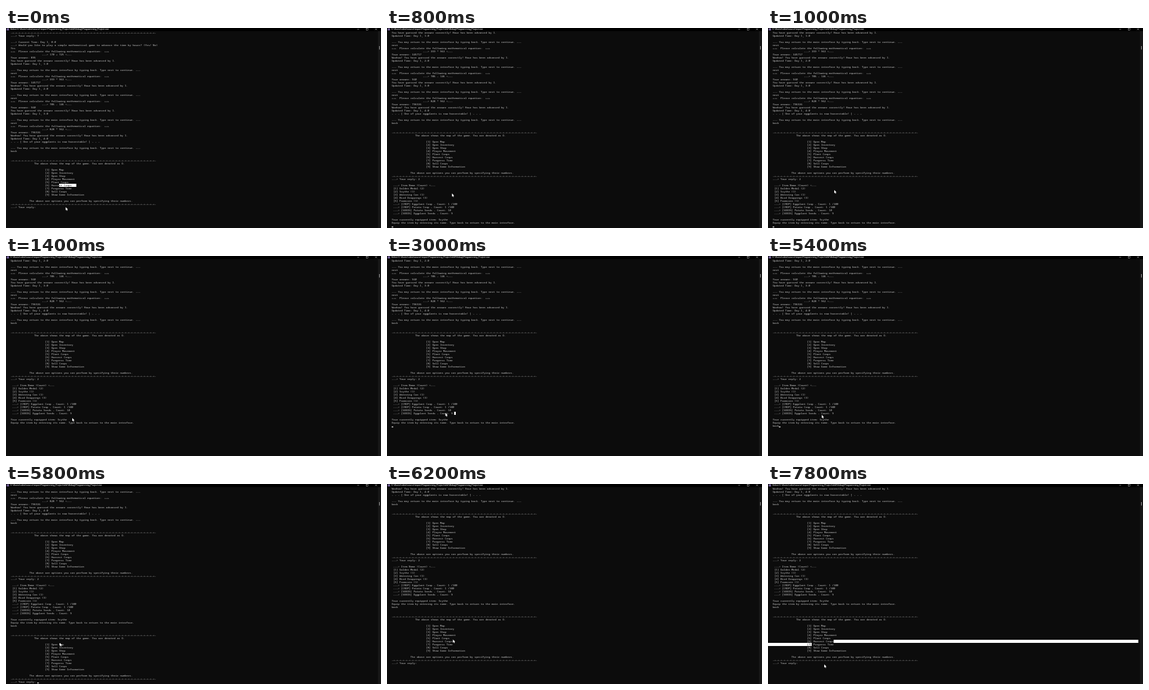
An HTML page with a canvas that plays this animation: 600 px wide and 321 px high, repeating every 8 s.

```html
<!DOCTYPE html>
<html lang="en">
<head>
<meta charset="utf-8">
<title>Console</title>
<style>
html, body { margin: 0; width: 100%; height: 100%; overflow: hidden; background: #0c0c0c; }
canvas { display: block; }
</style>
</head>
<body>
<canvas id="stage" width="600" height="321"></canvas>
<script>
const ctx = document.getElementById('stage').getContext('2d');
const LOOP = 8000, STEP = 200, CW = 2.5, RH = 5, ROWS = 63, BG = '#0c0c0c';
const PATH = 'C:\\Users\\robin\\source\\repos\\Programming_Project\\x64\\Debug\\Programming_Project.exe';

// Console text; the left margin is three columns
const pad = (n, s) => ' '.repeat(n) + s;
const rule = pad(3, '-+'.repeat(46) + '-');
const more = '--- You may return to the main interface by typing back. Type next to continue. ---';
const left = (...list) => list.map(s => pad(3, s));

function quiz(sum, answer, cheer, hour) {
  return left('+++  Please calculate the following mathematical equation:  +++',
    pad(20, `---> ${sum} <---`), `Your answer: ${answer}`,
    `${cheer} the answer correctly! Hour has been advanced by 1.`,
    `Updated Time: Day 1, ${hour}:0`);
}

const options = ['Open Map', 'Open Inventory', 'Open Shop', 'Player Movement', 'Plant Crops',
  'Harvest Crops', 'Progress Time', 'Sell Crops', 'Show Game Information'];
const menu = ['', '', rule,
  pad(18, 'The above shows the map of the game. You are denoted as O.'), '',
  ...options.map((s, i) => pad(25, `[${i + 1}] ${s}`)), '',
  pad(15, 'The above are options you can perform by specifying their numbers.'), rule];
const next = ['', ...left(more, 'next')];
const plain = 'You have guessed', happy = 'Woohoo! You have guessed';

const lines = [
  rule, ...left('---> Your reply: 7', '', '---> Current Time: Day 1, 0:0',
    '---> Would you like to play a simple mathematical game to advance the time by hours? (Yes/ No)', 'Yes'),
  ...quiz('170 + 725', 895, plain, 1), ...next,
  ...quiz('359 * 963', 345717, happy, 2), ...next,
  ...quiz('706 - 146', 560, plain, 3), ...next,
  ...quiz('828 * 962', 796536, happy, 4),
  ...left('- - - [ One of your eggplants is now harvestable! ] - - -', '', more, 'back'),
  ...menu];
const reply = lines.length;
lines.push('', '', ...[
  '---> Item Name (Count) <---', '[1] Golden Medal (2)', '[2] Scythe (1)', '[3] Watering Can (1)',
  '[4] Bird Droppings (3)', '[5] Farmcoin (1)',
  '---> [CROP] Eggplant Crop - Count: 1 /100', '---> [CROP] Potato Crop - Count: 1 /100',
  '---> [SEEDS] Potato Seeds - Count: 10', '---> [SEEDS] Eggplant Seeds - Count: 9'
].map(s => pad(4, s)), '', ...left('Your currently equipped item: Scythe',
  'Equip the item by entering its name. Type back to return to the main interface.'));
const equip = lines.length;
lines.push('', ...menu, pad(3, '---> Your reply: '));
const last = lines.length - 1;

// [start, scrolled lines, last printed line]
const views = [[0, 0, reply], [800, 9, equip], [1400, 18, equip], [5800, 27, last], [6200, 33, last]];

// [start, ...[row, from column, to column]]
const selections = [[0, [50, 34, 45]], [400], [3000, [50, 43, 44]], [3400, [56, 21, 22]], [5000],
  [7000, [50, 42, 43]], [7200, [50, 42, 237], [51, 0, 28]]];

// [time, x, y] of the pointer tip
const pointer = [[0, 95.5, 287.5], [1000, 106, 260], [1600, 106, 260], [3000, 93.5, 252],
  [3400, 53, 282], [4000, 75.5, 265.5], [4800, 75.5, 265.5], [5400, 86, 255], [5800, 86, 255],
  [6200, 105.5, 249.5], [7000, 105.5, 249.5], [7400, 69, 255], [7800, 90, 289.5]];

const at = (list, t) => list.filter(e => e[0] <= t).pop();

function pointerAt(t) {
  const i = pointer.findIndex(p => p[0] >= t);
  if (i < 1) return pointer[0].slice(1);
  const [t0, x0, y0] = pointer[i - 1], [t1, x1, y1] = pointer[i];
  const k = (t - t0) / (t1 - t0);
  return [x0 + (x1 - x0) * k, y0 + (y1 - y0) * k];
}

function caretOn(t) {
  if (t < 400 || t >= 7000) return false;
  if (t >= 2650 && t < 6000) return true;
  return Math.floor(t / 530) % 2 === (t < 6000 ? 1 : 0);
}

function box(color, x, y, w, h) {
  ctx.fillStyle = color;
  ctx.fillRect(x, y, w, h);
}

// Drawn large and scaled down so that advances stay fractional
function text(s, x, y, color, font, size) {
  ctx.save();
  ctx.translate(x, y);
  ctx.scale(1 / 6, 1 / 6);
  ctx.font = `${size * 6}px ${font}`;
  ctx.fillStyle = color;
  ctx.fillText(s, 0, 0);
  ctx.restore();
}

const mono = (s, col, row, color) =>
  text(s, col * CW, row * RH + 3.9, color, '"Noto Sans Mono", monospace', CW / 0.6);

function drawFrame(selecting) {
  box('#000', 0, 0, 600, 5);
  box('#6b5a8e', 1, 0.5, 4, 3.5);
  text((selecting ? 'Select ' : '') + PATH, 7, 3.3, '#fff', 'Roboto, sans-serif', 3.65);
  box('#ccc', 562, 1.8, 3, 0.5);
  ctx.lineWidth = 0.5;
  ctx.strokeStyle = '#ccc';
  ctx.strokeRect(576.5, 0.7, 2.6, 2.6);
  ctx.beginPath();
  ctx.moveTo(590.7, 0.6); ctx.lineTo(593.5, 3.4);
  ctx.moveTo(593.5, 0.6); ctx.lineTo(590.7, 3.4);
  ctx.stroke();
  box('#171717', 595, 5, 5, 316);
  box('#9f9f9f', 597, 29, 1, 5.5);
}

function drawPointer(x, y) {
  ctx.save();
  ctx.translate(x, y);
  ctx.beginPath();
  [[0, 0], [0, 5.2], [1.2, 4.1], [2, 6], [2.9, 5.6], [2.1, 3.8], [3.7, 3.7]]
    .forEach(p => ctx.lineTo(...p));
  ctx.closePath();
  ctx.fillStyle = '#fff';
  ctx.fill();
  ctx.restore();
}

function draw(t) {
  const [, scroll, end] = at(views, t);
  const [, ...selected] = at(selections, t);
  const typed = t < 5200 ? '' : t < 5400 ? 'ba' : 'back';
  lines[reply] = pad(3, '---> Your reply: ') + (t < 600 ? '' : '2');
  lines[equip] = pad(3, typed);

  box(BG, 0, 0, 600, 321);
  for (let row = 1; row <= ROWS && row - 1 + scroll <= end; row++)
    mono(lines[row - 1 + scroll], 0, row, '#ccc');

  for (const [row, from, to] of selected) {
    const i = row - 1 + scroll;
    box('#fff', from * CW, row * RH, (to - from) * CW, RH);
    if (i <= end) mono(lines[i].slice(from, to), from, row, BG);
  }
  if (caretOn(t)) box('#f2f2f2', lines[end].length * CW, (end - scroll + 1) * RH + 3.7, CW, 1.3);

  drawFrame(selected.length > 0);
  drawPointer(...pointerAt(t));
}

function tick(now) {
  draw(Math.floor(now % LOOP / STEP) * STEP);
  requestAnimationFrame(tick);
}
requestAnimationFrame(tick);
</script>
</body>
</html>
```
